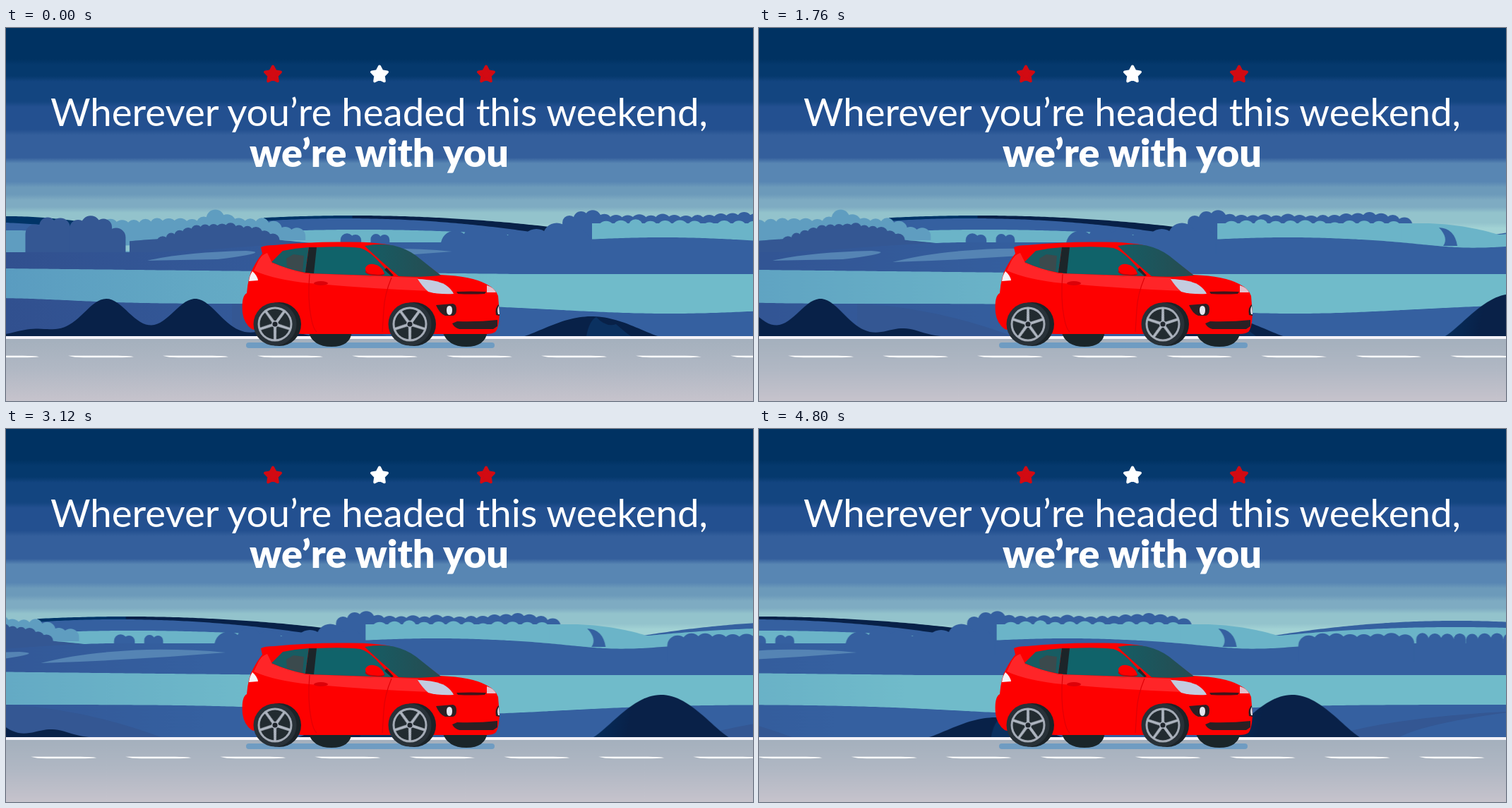
These frames come from a looping animation (1058x529 px, 4880 ms). An HTML page:

```html
<!DOCTYPE html>
<html lang="en">
<head>
<meta charset="utf-8">
<title>Weekend drive</title>
<style>
  html, body { margin: 0; width: 100%; height: 100%; overflow: hidden; background: #003262; }
  svg { display: block; width: 100vw; height: 100vh; }
  text { font-family: Lato, "Open Sans", sans-serif; fill: #fff; text-anchor: middle; }
  #world { animation: drive 4880ms steps(61) infinite; }
  .spokes { animation: roll 4880ms steps(61) infinite; }
  @keyframes drive { to { transform: translateX(-501.6px); } }
  @keyframes roll { from { transform: rotate(36deg); } to { transform: rotate(768deg); } }
</style>
</head>
<body>
<svg viewBox="0 0 1058 529" xmlns="http://www.w3.org/2000/svg">
  <defs>
    <linearGradient id="sky" gradientUnits="userSpaceOnUse" x1="0" y1="0" x2="0" y2="300"></linearGradient>
    <linearGradient id="road" x1="0" y1="0" x2="0" y2="1">
      <stop offset="0" stop-color="#a4b0bd"/>
      <stop offset=".5" stop-color="#b1b8c4"/>
      <stop offset="1" stop-color="#c6c3cc"/>
    </linearGradient>
    <linearGradient id="field" gradientUnits="userSpaceOnUse" x1="0" y1="0" x2="700" y2="0">
      <stop offset="0" stop-color="#5a9cc0"/>
      <stop offset="1" stop-color="#70bbca"/>
    </linearGradient>
    <linearGradient id="meadow" gradientUnits="userSpaceOnUse" x1="0" y1="0" x2="600" y2="0">
      <stop offset="0" stop-color="#31508f"/>
      <stop offset="1" stop-color="#3560a0"/>
    </linearGradient>
    <linearGradient id="ridge" gradientUnits="userSpaceOnUse" x1="490" y1="0" x2="491" y2="0">
      <stop stop-color="#003467"/>
      <stop offset="1" stop-color="#082148"/>
    </linearGradient>
    <linearGradient id="mound" gradientUnits="userSpaceOnUse" x1="1215" y1="0" x2="1285" y2="14">
      <stop stop-color="#043365"/>
      <stop offset="1" stop-color="#092148"/>
    </linearGradient>
    <linearGradient id="glass">
      <stop stop-color="#155d65"/>
      <stop offset="1" stop-color="#274b50"/>
    </linearGradient>
    <g id="wheel">
      <circle cx="6" r="31" fill="#1b2328"/>
      <circle r="30.500" fill="#283138"/>
      <circle r="24.500" fill="#a3aab5"/>
      <circle r="21.500" fill="#222b30"/>
      <g class="spokes"></g>
      <circle r="5" fill="#a9b0bb"/>
      <circle r="3.500" fill="#20262d"/>
    </g>
  </defs>

  <rect width="1058" height="529" fill="url(#sky)"/>
  <g id="world"></g>

  <rect x="340" y="446" width="352" height="8" rx="4" fill="#6f9cc2"/>
  <g id="car">
    <path d="M428 430h62q-2 22-29 22t-33-22zM618 430h64q-3 22-30 22t-34-22z" fill="#1a2529"/>
    <path d="M361 311Q366 308 380 308Q430 303 480 303.500Q525 303 549 309Q568 314 580 324L615 350
      Q660 352 680 363Q694 370 697 380L699 405Q698 426 693 431Q689 434 680 434H420
      Q354 430 348 427Q337 419 335 404Q333 380 341 376Q343 352 350 340Q357 327 363 320Z" fill="#fe0000"/>
    <path d="M358 329Q363 321 370 319L377 333Q402 343 425 348L583 354Q592 365 600 373
      Q520 370 430 362Q380 357 351 344Z" fill="#ff2528"/>
    <path d="M376 332L392 316Q410 312 429 311L424 347Q398 342 376 332Z" fill="#175c62"/>
    <path d="M397 327l10-6 15 2-2 23-22-7z" fill="#3b4a4d"/>
    <path d="M440 311Q480 309 502 312Q512 315 524 327L547 352L430 348Z" fill="#10636a"/>
    <path d="M429 311H440L436 348L424 347Z" fill="#1c2529"/>
    <path d="M508 309Q532 305 549 308.500Q568 313 581 323L616 351Q582 354 556 352Q530 330 508 309Z" fill="url(#glass)"/>
    <path d="M546 352l-10-9 3-3 10 11z" fill="#1c2529"/>
    <path d="M509 340q3-6 12-5 11 2 15 13-2 3-13 2-15 0-14-10z" fill="#fe0000"/>
    <path d="M509 345q3 5 14 5 11 1 13-2" fill="none" stroke="#c70008" stroke-width="1.500"/>
    <path d="M430 349Q427 385 432 410Q435 427 440 431M546 354Q536 378 535 400L533 431"
      fill="none" stroke="#df0006" stroke-width="1.200"/>
    <ellipse cx="446" cy="362" rx="10" ry="3" fill="#dc0008"/>
    <path d="M349 345Q356 351 357 358L344 359Q345 351 349 345Z" fill="#f5f3f8"/>
    <path d="M583 356Q610 357 622 364Q631 370 634 377Q612 378 598 374Q590 367 583 356Z" fill="#c3cce0"/>
    <path d="M681 365Q691 368 694 375L681 375Z" fill="#e3bfcb"/>
    <path d="M638 374q20-1 42 0l-2 3q-20 1-38 0z" fill="#40141a"/>
    <path d="M609 393l24-2q5 1 5 8 0 8-5 9h-11q-8-3-13-15zM698 392q-6 4-4 15l5 1zM632 419l7-3q30 1 57-2v9l-6 4H642q-7-2-10-8z" fill="#2a2024"/>
    <path d="M628 394q4 0 4 6 0 7-4 7t-4-7q0-6 4-6zM698 394q-3 5-1 12h2z" fill="#e4e7f0"/>
    <use href="#wheel" x="381" y="420"/>
    <use href="#wheel" x="572" y="420"/>
  </g>

  <g id="stars"></g>
  <text x="528.500" y="138.500" font-size="57" font-weight="400" data-w="931">Wherever you’re headed this weekend,</text>
  <text x="528.500" y="197" font-size="56" font-weight="900" data-w="367">we’re with you</text>
</svg>

<script>
const $ = s => document.querySelector(s);
const BLUE = '#3560a0', TEAL = '#6bb4c8', NAVY = '#082148', DEEP = '#345793', MIST = '#5f9dc0';
const END = 1570;

function add(parent, tag, attrs) {
  const el = document.createElementNS('http://www.w3.org/2000/svg', tag);
  for (const k in attrs) el.setAttribute(k, attrs[k]);
  parent.append(el);
  return el;
}
const shape = (fill, d, parent = $('#world')) => add(parent, 'path', { fill, d });

// Height profiles
const bump = (x, c, h, w) => h * Math.exp(-(((x - c) / w) ** 2));
const bowl = (x, c, w) => ((x - c) / w) ** 2;
const dome = (x, x0, x1, h) => h * Math.sin(Math.PI * (x - x0) / (x1 - x0)) ** 1.2;
const ease = t => { t = Math.max(0, Math.min(1, t)); return t * t * (3 - 2 * t); };

let seed = 7;
const random = () => (seed = seed * 16807 % 2147483647) / 2147483647;

// Ground between x0 and x1 whose upper edge is y(x).
function land(fill, x0, x1, base, y) {
  let d = `M${x0} ${base}`;
  for (let x = x0; x <= x1; x += 4) d += `L${x} ${y(x).toFixed(1)}`;
  shape(fill, `${d}V${base}Z`);
}

// A row of round crowns of about radius r, following top(x).
function grove(fill, x0, x1, base, r, top, gap = 1.5) {
  let d = '';
  for (let x = x0; x <= x1; x += r * gap) {
    const w = r * (.9 + .3 * random()), y = top(x) + r * .3 * (random() - .5) + w;
    d += `M${x - w} ${y}a${w} ${w} 0 0 1 ${2 * w} 0V${Math.max(base, y)}h${-2 * w}Z`;
  }
  shape(fill, d);
}

// Sky in soft-edged bands
const bands = { 0: '#003262', 48: '#05396d', 72: '#134580', 108: '#235090', 148: '#345f9c',
  188: '#5886b3', 222: '#6c9aba', 240: '#7eabc2', 258: '#93c3cc', 280: '#a2d2d4' };
let last = '#003262';
for (const y in bands) {
  add($('#sky'), 'stop', { offset: (y - 4) / 300, 'stop-color': last });
  add($('#sky'), 'stop', { offset: (+y + 4) / 300, 'stop-color': last = bands[y] });
}

// Distant hills
land('#003467', -10, 130, 300, x => 267 + bowl(x, 0, 38));
land('url(#ridge)', 365, 780, 310, x => 266 + bowl(x, 490, 70));
land(BLUE, -10, 240, 320, x => 276 + x * .06);
land(BLUE, 365, 1200, 320, x => 270 + Math.min(22, bowl(x, 480, 60)));
land(BLUE, 1225, END, 330, x => 272 + bowl(x, 1480, 56));

// Wooded ridge with lighter crowns in front
grove(BLUE, 798, 1105, 300, 11, x => 265 - bump(x, 828, 7, 18) - bump(x, 1035, 4, 30) + bump(x, 1110, 6, 25));
land(TEAL, 830, END, 330, x => Math.min(277 + bowl(Math.max(x, 1120), 1120, 27), 281 + bowl(x, 1480, 72)));
grove(TEAL, 850, 1090, 300, 11, x => 274 - bump(x, 880, 3, 20), 1.9);
shape(BLUE, 'M1144 283Q1166 284 1170 309H1150Q1158 298 1144 283Z');
grove(BLUE, 1433, 1560, 304, 8, () => 290, 2.2);

// Fields and trees on the left
land(MIST, -10, 270, 325, x => 287 + bowl(x, 0, 60));
land(TEAL, 330, 720, 325, x => 286 + bowl(x, 500, 80));
grove(MIST, 148, 414, 301, 11, x => 271 - bump(x, 299, 15, 18) + 13 * ease((x - 365) / 40));
for (const x of [489, 530]) grove(BLUE, x - 6, x + 6, 306, 8, () => 292);
shape('#8fc5cf', 'M110 317Q180 300 222 316Z');
land(DEEP, 175, 470, 322, x => 297 + bowl(x, 290, 50));
grove(DEEP, 222, 388, 304, 8, x => 277 + bowl(x, 305, 20));
grove(DEEP, 41, 80, 319, 12, x => 267 + bowl(x, 65, 7));
grove(DEEP, 102, 168, 319, 12, x => 266 + bowl(x, 122, 8));

// Blue middle ground
land('url(#meadow)', -10, END, 352, x =>
  318 - 14 * ease((x - 180) / 300) - bump(x, 930, 7, 150) + bump(x, 1190, 8, 90));
grove(BLUE, 636, 832, 320, 18, x => 288 - bump(x, 678, 8, 22) - bump(x, 785, 10, 24), 1.6);
grove(BLUE, 1272, 1420, 330, 13, () => 291);
shape('#5584b4', 'M200 330Q250 318 340 316Q380 318 300 328ZM370 332Q430 316 520 313Q580 312 632 317Q500 328 370 332Z');

// Wide field and meadow
land('url(#field)', -10, END, 437, x => 341 + Math.min(8, x * .011));
land('url(#meadow)', -10, END, 438, x => 391 - bump(x, -20, 8, 150) + bump(x, 940, 14, 230));
shape(DEEP, 'M320 391Q430 396 540 437H320ZM1300 437Q1390 408 1570 400Q1440 416 1400 437Z');

// Dark bushes and mounds
land(NAVY, -10, 450, 438, x => 438 - bump(x, 142, 54, 46) - bump(x, 268, 54, 46) - bump(x, 40, 11, 40) - bump(x, 385, 12, 34));
land(NAVY, 732, 926, 438, x => 438 - dome(x, 731, 927, 29));
shape('#0b3160', 'M822 437Q826 415 836 410Q850 425 864 420Q880 434 885 437Z');
land('url(#mound)', 1152, 1344, 438, x => 438 - dome(x, 1151, 1346, 61));

// Road
shape('url(#road)', 'M-10 440H1600V529H-10Z');
shape('#f3f2f8', 'M-10 437H1600V441H-10Z');
for (let x = -46; x < 1600; x += 134)
  shape('#fff', `M${x} 464.800h70q16 0 23 1.500-9 1-23 1h-48q-14 0-22-2.500z`);

for (let i = 0; i < 5; i++)
  shape('#aeb5c0', 'M-2 0L-1.800 -23H1.800L2 0Z', $('.spokes')).setAttribute('transform', `rotate(${i * 72})`);

// Rounded stars, evenly spaced
['#d20a12', '#fff', '#d20a12'].forEach((color, k) => {
  const pts = Array.from({ length: 10 }, (_, i) => {
    const r = i % 2 ? 6 : 11.5, a = (i / 5 - .5) * Math.PI;
    return `${378 + 151 * k + r * Math.cos(a)} ${66 + r * Math.sin(a)}`;
  });
  add($('#stars'), 'path', { d: `M${pts.join('L')}Z`, fill: color, stroke: color, 'stroke-width': 4, 'stroke-linejoin': 'round' });
});

// Choose the type size from the measured line length.
document.querySelectorAll('text').forEach(t => {
  const size = +t.getAttribute('font-size');
  t.setAttribute('font-size', size * t.dataset.w / t.getComputedTextLength());
});
</script>
</body>
</html>
```
